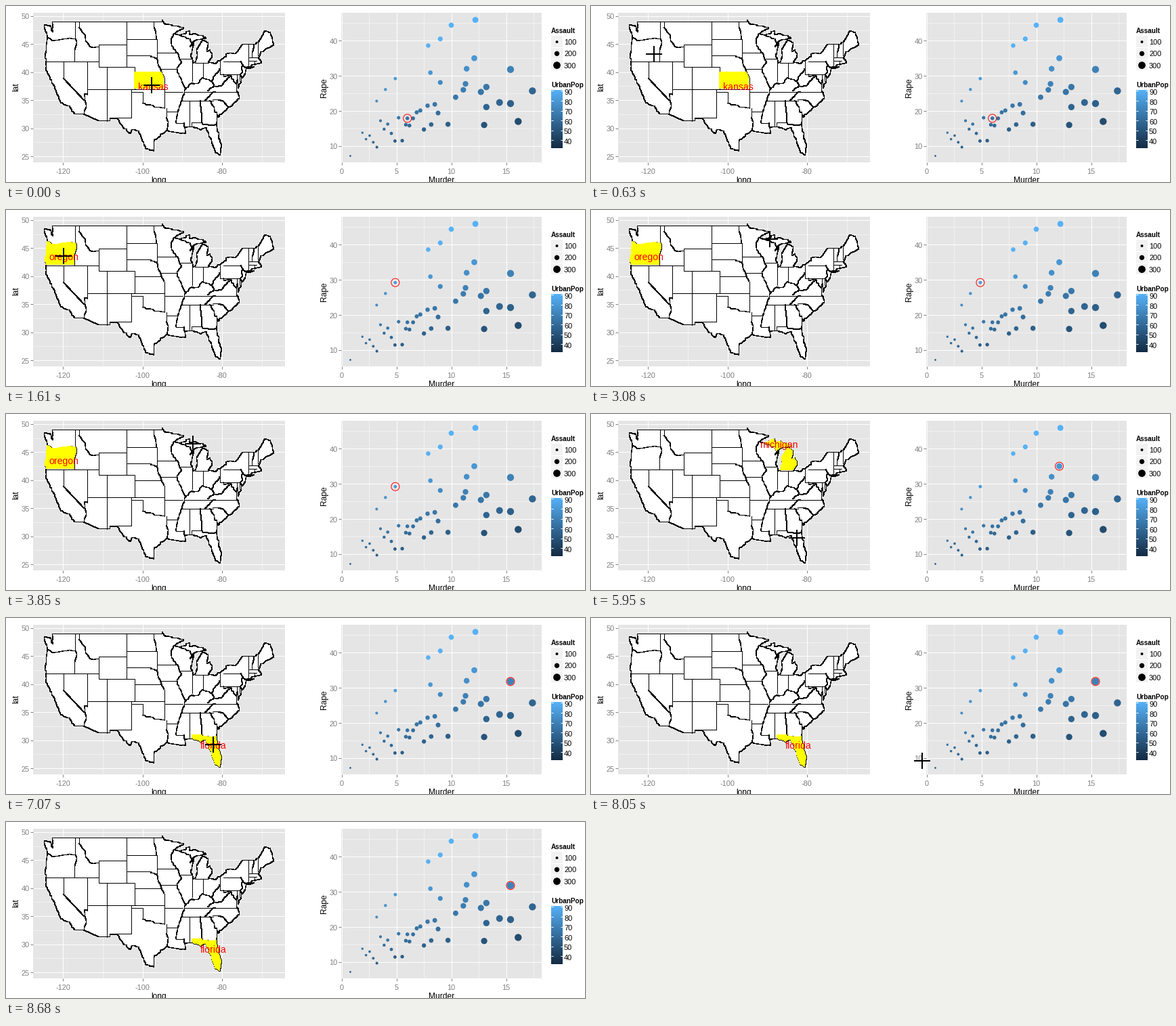
These frames come from a looping animation (855x260 px, 9.1 s). A matplotlib script:

```python
import numpy as np
import matplotlib.pyplot as plt
from matplotlib.animation import FuncAnimation
from matplotlib.collections import LineCollection, PolyCollection
from matplotlib.patches import Circle, Rectangle

W, H, DPI = 855, 260, 100
FRAMES, INTERVAL = 130, 70
PX = 72 / DPI  # points per pixel
FONT = "Liberation Sans"
HAIRLINE = 0.98 * PX
rng = np.random.default_rng(4)


def line(*pts):
    return np.array(pts, float)


def rough(*pts, amp=0.07):
    """Line through key points with small random bends, for coasts and rivers."""
    pts = line(*pts)
    out = [pts[:1]]
    for a, b in zip(pts[:-1], pts[1:]):
        t = np.linspace(0, 1, int(np.hypot(*(b - a)) / 0.45) + 2)[1:-1, None]
        out += [a + (b - a) * t + rng.normal(0, amp, (len(t), 2)), b[None]]
    return np.concatenate(out)


def join(*parts):
    return np.concatenate(parts)


# Coasts, clockwise from the north-west (longitude, latitude)
puget = rough((-123.95, 46.2), (-124.7, 48.37), (-123.1, 48.15), (-122.6, 47.2), (-122.75, 49))
superior = join(line((-95.15, 49), (-95.15, 49.38)),
                rough((-94.6, 48.7), (-92.4, 48.3), (-89.6, 48), (-92.1, 46.75), (-90.4, 46.56)))
upper_mi = rough((-90.4, 46.56), (-88, 47.4), (-88.2, 46.8), (-84.9, 46.6), (-84, 46),
                 (-86.6, 45.7), (-87.6, 45.1))
lake_west = rough((-87.6, 45.1), (-88, 44.55), (-87.1, 45.2), (-87.9, 43), (-87.3, 41.62),
                  (-86.82, 41.73))
lower_mi = rough((-86.82, 41.73), (-86.2, 42.8), (-86.4, 44), (-85.5, 45), (-84.8, 45.75),
                 (-83.4, 45.2), (-83.9, 43.7), (-82.9, 44.05), (-82.4, 43), (-83.45, 41.73))
northeast = join(rough((-83.45, 41.73), (-81.7, 41.5), (-78.9, 42.85), (-79.05, 43.27),
                       (-76.3, 43.5), (-74.7, 45)),
                 rough((-71.5, 45), (-70.8, 45.4), (-69.2, 47.4), (-67.8, 47.1), (-67, 44.85)))
atlantic = rough((-67, 44.85), (-70.2, 43.6), (-70.8, 42.5), (-70, 41.75), (-71.4, 41.5),
                 (-74, 40.7), (-74.1, 39.75), (-74.9, 38.95), (-75.5, 39.5), (-75.1, 38.4),
                 (-75.95, 37.15), (-76.1, 39.4), (-76.4, 37), (-75.6, 35.3), (-77.9, 33.9),
                 (-81.2, 31.9), (-81.45, 30.7))
florida_coast = rough((-81.45, 30.7), (-80.1, 26.8), (-80.4, 25.2), (-81.8, 26), (-82.7, 28),
                      (-84, 30.1), (-85.3, 29.7), (-87.5, 30.3))
gulf = rough((-87.5, 30.3), (-89.5, 30.2), (-89.1, 29.1), (-91, 29.2), (-93.85, 29.7),
             (-97.2, 27.7), (-97.2, 25.95))
rio_grande = rough((-97.2, 25.95), (-99.1, 26.4), (-101, 29.5), (-102.5, 29.8), (-103.15, 29),
                   (-104.7, 29.9), (-106.4, 31.75))
southwest = line((-108.2, 31.78), (-108.2, 31.33), (-111.07, 31.33), (-114.8, 32.5),
                 (-117.12, 32.53))
california = rough((-117.12, 32.53), (-118.5, 34), (-120.6, 34.6), (-122.5, 37.8),
                   (-124.35, 40.4), (-124.2, 42))
oregon_coast = rough((-124.2, 42), (-124.5, 42.85), (-123.95, 46.2))
outline = join(puget, superior, upper_mi, lake_west, lower_mi, northeast, atlantic,
               florida_coast, gulf, rio_grande, southwest, california, oregon_coast)
long_island = line((-74, 40.6), (-73.7, 40.87), (-71.9, 41.05), (-72.8, 40.7))

# Borders shared with a highlighted state
columbia = rough((-123.95, 46.2), (-122.5, 45.6), (-119, 46), (-116.92, 46), amp=0.03)
snake = rough((-116.92, 46), (-116.5, 45.5), (-117.03, 44), (-117.03, 42), amp=0.03)
up_border = rough((-87.6, 45.1), (-88.1, 45.9), (-90.4, 46.56), amp=0.03)
florida_north = line((-87.5, 30.3), (-87.6, 31), (-85, 31), (-84.8, 30.7), (-82.1, 30.5),
                     (-81.45, 30.7))
kansas = line((-102.05, 40), (-95.3, 40), (-94.6, 39.1), (-94.6, 37), (-102.05, 37))

# Straight borders: (latitude, west, east) and (longitude, north, south)
parallels = [(42, -124.2, -111.05), (45, -111.05, -104.05), (41, -111.05, -102.05),
             (37, -114.04, -94.6), (40, -102.05, -95.3), (43, -104.05, -97.9),
             (45.94, -104.05, -96.5), (43.5, -96.5, -91.2), (40.6, -95.8, -91.4),
             (36.5, -103, -100), (36.5, -94.6, -90), (33, -94.04, -91.1), (31, -91.6, -89.7),
             (32, -106.6, -103), (42.5, -90.6, -87.8), (41.73, -86.82, -83.45),
             (36.55, -89.5, -75.9), (35, -90.2, -82.3), (39.72, -80.52, -75.5),
             (42, -79.76, -75.35), (42.72, -73.3, -70.8), (42.03, -73.5, -71.3)]
meridians = [(-120, 42, 39), (-117.04, 49, 46), (-114.04, 42, 36.1), (-116.05, 49, 48),
             (-111.05, 45, 41), (-109.05, 41, 31.33), (-104.05, 49, 41), (-103, 37, 32),
             (-102.05, 41, 37), (-100, 36.5, 34.5), (-96.5, 45.94, 42.5), (-94.5, 39.1, 33.6),
             (-94.04, 33.6, 32), (-87.53, 41.7, 38.5), (-84.81, 41.7, 39.1), (-80.52, 42, 39.72),
             (-88.3, 35, 30.4), (-75.7, 39.7, 38.45), (-73.4, 45, 41), (-71, 45.3, 43.1),
             (-71.8, 42, 41.4)]
rivers = [
    rough((-114.04, 36.1), (-114.7, 36.1), (-114.2, 34.2), (-114.7, 32.7)),
    rough((-116.05, 48), (-114.4, 46.6), (-114.4, 45.6), (-113, 44.45), (-111.05, 44.5)),
    rough((-97.2, 49), (-96.5, 45.94)),
    rough((-97.9, 42.8), (-96.5, 42.5), (-95.3, 40), (-94.6, 39.1)),
    rough((-100, 34.5), (-97.2, 33.85), (-94.5, 33.6)),
    rough((-94.04, 32), (-93.55, 31.2), (-93.85, 29.7)),
    rough((-92.1, 46.75), (-92.8, 45.6), (-92.75, 44.75), (-91.2, 43.4), (-90.2, 41.8),
          (-91.4, 40.4), (-90.2, 38.6), (-89.15, 37), (-90.1, 35), (-91.1, 33), (-91.6, 31)),
    rough((-89.15, 37), (-88, 37.85), (-86.1, 38), (-84.82, 39.1), (-82.6, 38.4), (-80.52, 40.64)),
    rough((-75.35, 42), (-74.7, 41.36), (-75.2, 40.65), (-74.75, 40.2), (-75.5, 39.5)),
    rough((-74.7, 41.36), (-74, 40.7)),
    rough((-79.48, 39.72), (-79.48, 39.2), (-77.8, 39.5), (-77, 38.4), (-76.3, 37.9)),
    rough((-77.8, 39.4), (-80.3, 37.5), (-82, 37.5), (-82.6, 38.4)),
    rough((-82, 37.5), (-83.68, 36.6)),
    rough((-81.68, 36.59), (-84.3, 35)),
    rough((-83.1, 35), (-80.9, 32.05)),
    rough((-72, 45), (-72.46, 42.73)),
    line((-82.3, 35.1), (-81, 35.1), (-79.67, 34.8), (-78.6, 33.87)),
    line((-85.6, 35), (-85.1, 32.8), (-85, 31)),
    line((-120, 39), (-114.63, 35)),
    line((-89.7, 31), (-89.5, 30.2)),
]
borders = [columbia, snake, up_border, florida_north] + rivers
borders += [line((w, lat), (e, lat)) for lat, w, e in parallels]
borders += [line((lon, n), (lon, s)) for lon, n, s in meridians]


def map_xy(pts):
    pts = np.asarray(pts, float)
    return np.column_stack([40 + (pts[:, 0] + 127.56) * 5.864, 10 + (50.595 - pts[:, 1]) * 8.284])


def map_pixels(pts):
    return np.floor(map_xy(pts))


def plot_xy(murder, rape):
    return 495.5 + murder * 16.2, 10 + (47.935 - rape) * 5.191


def urban_color(v):
    low, high = np.array([0x13, 0x2B, 0x43]), np.array([0x56, 0xB1, 0xF7])
    return (low + (high - low) * (v - 32) / 59) / 255


def dot_radius(assault):
    return 1 + 5 * (assault - 45) / 292


fig = plt.figure(figsize=(W / DPI, H / DPI), dpi=DPI, facecolor="white")
ax = fig.add_axes([0, 0, 1, 1])
ax.axis("off")


def text(x, y, s, size=11, color="black", ha="center", **kw):
    return ax.text(x, y, s, fontsize=size * PX, color=color, ha=ha, va="baseline",
                   family=FONT, **kw)


def rect(x0, y0, x1, y1, color):
    ax.add_patch(Rectangle((x0, y0), x1 - x0, y1 - y0, fc=color, ec="none", lw=0))


def stroke(x0, y0, x1, y1, color):
    ax.plot([x0, x1], [y0, y1], color=color, lw=HAIRLINE, solid_capstyle="butt")


def dot(x, y, r, color):
    ax.add_patch(Circle((x, y + 0.5), r, fc=color, ec="none", lw=0, zorder=4))


def panel(x0, x1, xticks, yticks, xminor, yminor):
    """Grey plot area; ticks are (pixel, label) pairs."""
    top, bottom, grey = 10, 231, "#7F7F7F"
    rect(x0, top, x1, bottom, "#E5E5E5")
    for x in xminor:
        stroke(x, top, x, bottom, "#F2F2F2")
    for y in yminor:
        stroke(x0, y, x1, y, "#F2F2F2")
    for x, label in xticks:
        stroke(x, top, x, bottom, "white")
        stroke(x, bottom, x, bottom + 4, grey)
        text(x, 247.5, label, color=grey)
    for y, label in yticks:
        stroke(x0, y, x1, y, "white")
        stroke(x0 - 4, y, x0, y, grey)
        text(x0 - 5, y + 4.5, label, color=grey, ha="right")


def lon_px(v):
    return map_xy([(v, 0)])[0, 0]


def lat_px(v):
    return map_xy([(0, v)])[0, 1]


panel(40, 412, [(lon_px(v), v) for v in (-120, -100, -80)],
      [(lat_px(v), v) for v in range(25, 51, 5)],
      [lon_px(v) for v in (-110, -90, -70)],
      [lat_px(v) for v in np.arange(27.5, 48, 5)])
panel(494.5, 791, [(plot_xy(v, 0)[0], v) for v in range(0, 16, 5)],
      [(plot_xy(0, v)[1], v) for v in range(10, 41, 10)],
      [plot_xy(v, 0)[0] for v in np.arange(2.5, 18, 5)],
      [plot_xy(0, v)[1] for v in range(15, 46, 10)])
text(226, 261, "long", 12)
text(643, 261, "Murder", 12)
text(18.5, 120, "lat", 12, rotation=90, rotation_mode="anchor")
text(472.5, 121, "Rape", 12, rotation=90, rotation_mode="anchor")

# Map
ax.add_collection(PolyCollection([map_pixels(p) + 0.5 for p in (outline, long_island)],
                                 facecolors="white", edgecolors="black", linewidths=HAIRLINE,
                                 antialiaseds=False, zorder=3))
ax.add_collection(LineCollection([map_pixels(b) + 0.5 for b in borders], colors="black",
                                 linewidths=HAIRLINE, antialiaseds=False, zorder=3.1))

# Scatter: the spread-out states are placed, the dense low cluster follows a trend
spread = [(10, 44.5), (8.1, 31), (9, 40.6), (15.4, 31.9), (17.4, 25.8), (15.4, 22.2),
          (11.3, 27.8), (16.1, 17.1), (13, 16.1), (14.4, 22.5), (13.2, 26.9), (13.2, 21.2),
          (12.7, 25.5), (7.9, 38.7), (12.2, 46), (11.4, 32.1), (4.9, 29.3), (3.2, 22.9),
          (4, 26.2), (10.4, 24), (12.1, 35.1), (9, 28.2), (11.1, 26.1), (9.7, 16.3),
          (8.8, 19.5), (6, 18)]
low_murder = np.linspace(1.9, 8.5, 21)
cluster = zip(low_murder, 7.5 + 1.55 * low_murder + rng.normal(0, 2, low_murder.size))
for murder, rape in [*spread, (0.8, 7.3), *cluster]:
    assault = min(55 + 15.5 * murder, 290)
    urban = np.clip(45 + 1.5 * (rape - murder), 40, 91)
    dot(*plot_xy(murder, rape), dot_radius(assault), urban_color(urban))

# Legends
text(805, 40.5, "Assault", 10, ha="left", weight="bold")
for i, assault in enumerate((100, 200, 300)):
    y = 52.5 + 17.3 * i
    rect(805, y - 8.3, 822, y + 8.3, "#F2F2F2")
    dot(813.5, y, dot_radius(assault), "black")
    text(824, y + 4.5, assault, ha="left")

text(805, 120.5, "UrbanPop", 10, ha="left", weight="bold")
ramp = np.array([[urban_color(v)] for v in np.linspace(91, 32, 86)])
ax.imshow(ramp, extent=(805, 822, 210, 124), aspect="auto", interpolation="nearest")
ax.set(xlim=(0, W), ylim=(H, 0))
for v in range(40, 91, 10):
    y = 124 + (91 - v) / 59 * 86
    stroke(805, y, 808.4, y, "white")
    stroke(818.6, y, 822, y, "white")
    text(824, y + 5.5, v, ha="left")

# Selection: first frame, label, label centre, scatter position, outlines
selections = [
    (0, "kansas", (217, 119), (6, 18), [kansas]),
    (23, "oregon", (85, 69), (4.9, 29.3), [join(oregon_coast, columbia, snake)]),
    (66, "michigan", (277, 45), (12.1, 35.1), [join(upper_mi, up_border), lower_mi]),
    (101, "florida", (306.5, 188), (15.4, 31.9), [join(florida_coast, florida_north)]),
]
fill = PolyCollection([], facecolors="yellow", edgecolors="none", antialiaseds=False, zorder=5)
ax.add_collection(fill)
label = text(0, 0, "", 14, "red", zorder=6)
ring = Circle((0, 0), 6, fc="none", ec="red", lw=PX, zorder=6)
ax.add_patch(ring)
cursor = LineCollection([], colors="black", linewidths=2 * PX, antialiaseds=False, zorder=7)
ax.add_collection(cursor)

# Pointer moves: first frame, steps, destination, ease-out power
moves = [(1, 12, (85, 68), 2), (28, 8, (257, 41), 2), (37, 2, (258, 43), 1),
         (41, 12, (275, 44), 1), (55, 1, (276, 44), 1), (71, 12, (301, 174), 3),
         (84, 3, (306, 187), 1), (111, 13, (783, 250), 1)]
LEAVES = 124


def pointer(frame):
    pos = np.array([215.0, 117.0])
    for start, steps, goal, power in moves:
        u = np.clip((frame - start + 1) / steps, 0, 1)
        pos += (np.array(goal) - pos) * (1 - (1 - u) ** power)
    return np.round(pos)


def update(frame):
    _, name, (tx, ty), point, shapes = [s for s in selections if s[0] <= frame][-1]
    # Top and left borders are covered, bottom and right ones stay visible
    fill.set_verts([map_pixels(s) for s in shapes])
    label.set_text(name)
    label.set_position((tx, ty + 4.6))
    px, py = plot_xy(*point)
    ring.center = px, py + 0.5
    x, y = pointer(frame)
    cursor.set_segments([[(x - 12, y), (x + 12, y)], [(x, y - 12), (x, y + 12)]])
    cursor.set_visible(frame < LEAVES)
    return fill, label, ring, cursor


anim = FuncAnimation(fig, update, frames=FRAMES, interval=INTERVAL, repeat=True, repeat_delay=0)
plt.show()
```
